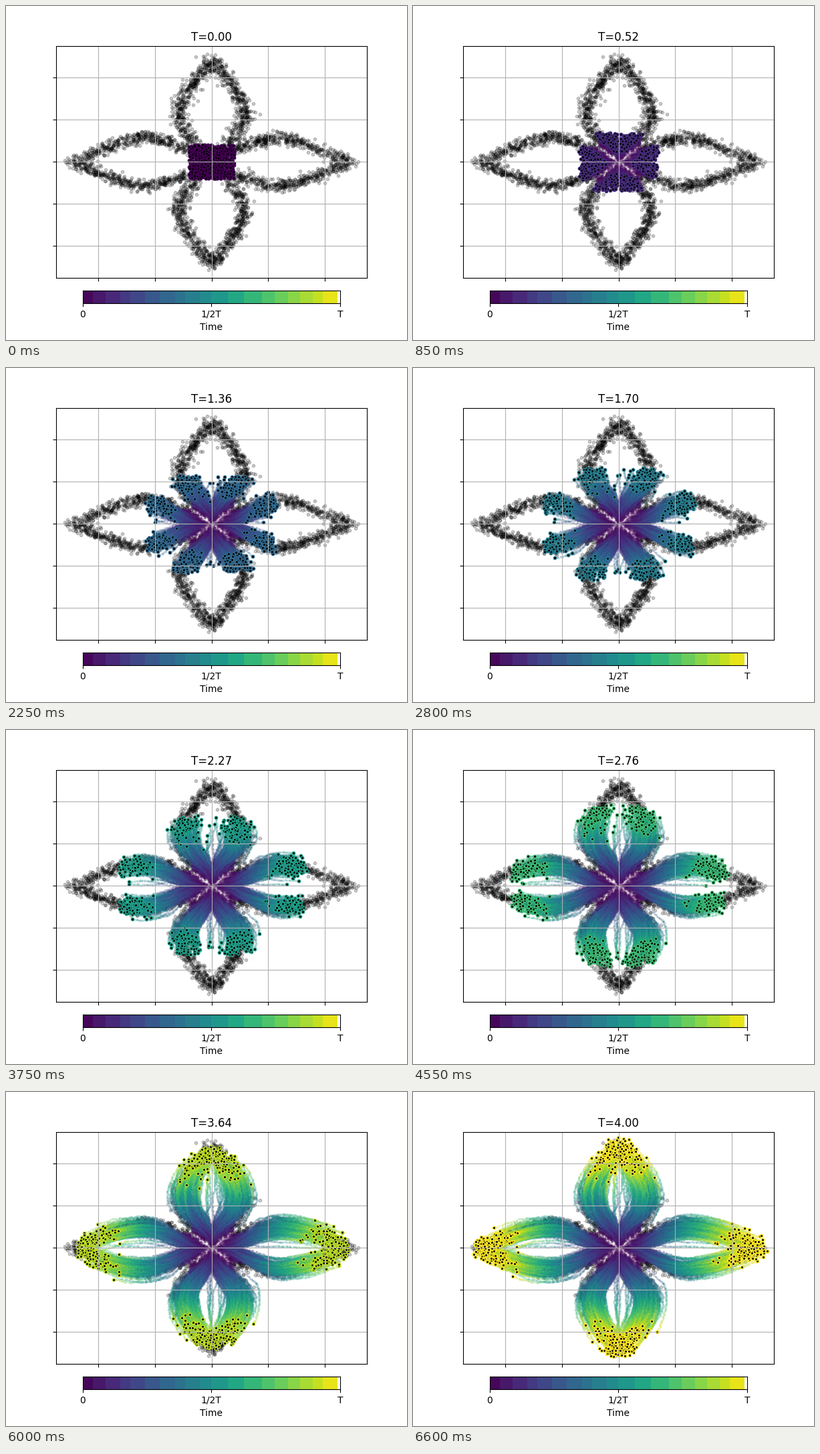
Recreate the animation shown at these times as a matplotlib script. Size 600 by 500 pixels, loop 6650 ms.

```python
import numpy as np
import matplotlib.pyplot as plt
from matplotlib.animation import FuncAnimation

FRAMES = 133
T_END = 4.0
TIP = 2.45          # petal length in grid units
N_PART = 700
N_STRAND = 430

rng = np.random.default_rng(7)
times = np.linspace(0, T_END, FRAMES)
viridis = plt.get_cmap("viridis")


def arch(u):
    """Smooth hump from 0 over 1 back to 0 along a petal."""
    return np.sin(np.pi * np.clip(u, 0, TIP) / TIP)


def outline(u):
    """Half width of a petal: round near the middle, straighter to the tip."""
    curve = arch(u) ** 1.15
    slope = 2 - 2 * u / TIP
    return 0.58 * np.where(u < TIP / 2, curve, (curve + slope) / 2)


def petal_points():
    """Noisy outline of the four petals."""
    parts = []
    for axis in (0, 1):
        for along in (-1, 1):
            for side in (-1, 1):
                u = rng.uniform(0.4, TIP, N_STRAND)
                uv = np.stack([along * u, side * outline(u)], axis=1)
                uv += rng.normal(0, 0.075, uv.shape)
                parts.append(uv[:, ::-1] if axis else uv)
    return rng.permutation(np.concatenate(parts))


def particle_paths():
    """Positions with shape (frame, particle, 2)."""
    start = rng.uniform(-0.4, 0.4, (N_PART, 2))
    sign = np.where(start < 0, -1, 1)
    size = np.abs(start)
    sideways = size[:, 0] > size[:, 1]
    u0, v0 = size.max(axis=1), size.min(axis=1)
    q = 2 * v0 / u0 - 1     # -1 beside the axis, 1 on the diagonal

    walk = np.cumsum(rng.normal(0, 0.004, (2, FRAMES, N_PART)), axis=1)
    walk += rng.normal(0, 0.006, walk.shape)
    walk -= walk[:, :1]
    t = times[:, None]
    u = u0 + (0.44 + 0.1 * u0 / 0.4 - 0.04 * q * q) * t + walk[0]

    lane = 0.18 * q + rng.normal(0, 0.07, N_PART)
    spread = np.where(rng.random(N_PART) < 0.025, rng.uniform(0, 0.3, N_PART), 1)
    e = np.clip(t / 1.6, 0, 1)
    e = e * e * (3 - 2 * e)
    v = v0 * (1 - e) + (0.48 * arch(u) + lane) * spread * e + walk[1]

    x = np.where(sideways, u, v) * sign[:, 0]
    y = np.where(sideways, v, u) * sign[:, 1]
    return np.stack([x, y], axis=2)


fig = plt.figure(figsize=(6, 5), dpi=100, facecolor="white")
ax = fig.add_axes([0.125, 0.186, 0.775, 0.694])
ax.set(xlim=(-2.75, 2.75), ylim=(-2.76, 2.75),
       xticks=range(-2, 3), yticks=range(-2, 3))
ax.tick_params(labelbottom=False, labelleft=False)
ax.grid(True)
title = ax.set_title("T=0.00")

ax.scatter(*petal_points().T, s=10, c="k", alpha=0.2, linewidths=1, zorder=1)

paths = particle_paths()
colors = viridis(times / T_END)
trail = [ax.plot(p[:, 0], p[:, 1], "o", ms=2.4, mew=0, color=c, alpha=0.2,
                 zorder=1.1, visible=False)[0]
         for p, c in zip(paths, colors)]
heads = ax.scatter(*paths[0].T, s=10, c="k", edgecolors=[colors[0]],
                   linewidths=1, zorder=1.2)

# Time scale in coarse colour bands, with a blank sliver at the end
bar = fig.add_axes([114.8 / 600, 0.11, 385 / 600, 0.038])
edges = np.array([115, 130, 149, 171, 186, 208, 230, 253, 268, 290, 307,
                  332, 356, 383, 402, 422, 440, 459, 474, 496])
edges = (edges - 115) / 385
for a, b in zip(edges[:-1], edges[1:]):
    bar.axvspan(a, b, color=viridis((a + b) / 2), lw=0)
bar.set(xlim=(0, 1), ylim=(0, 1), yticks=[], xlabel="Time")
bar.set_xticks([0, 0.5, 1], ["0", "1/2T", "T"])


def update(i):
    title.set_text(f"T={times[i]:.2f}")
    for k, dots in enumerate(trail):
        dots.set_visible(k <= i)
    heads.set_offsets(paths[i])
    heads.set_edgecolor([colors[i]])
    return [title, heads, *trail]


anim = FuncAnimation(fig, update, frames=FRAMES, interval=50,
                     repeat=True, repeat_delay=0, blit=False)
plt.show()
```
